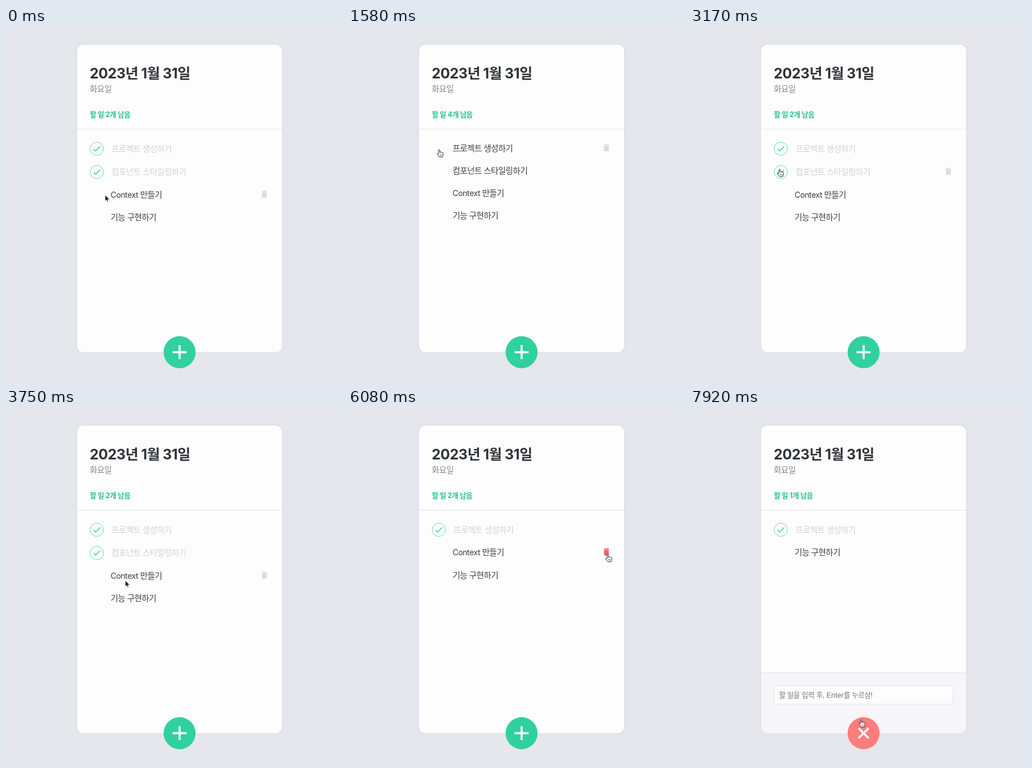
An HTML page for the animation above (8000 ms loop, 600 px wide and 630 px high).

```html
<!DOCTYPE html>
<html lang="ko">
<head>
<meta charset="utf-8">
<title>할 일 목록</title>
<style>
html, body { margin: 0; width: 100%; height: 100%; overflow: hidden; background: #e5e7ec; }
svg { display: block; }
text {
  font: 14.8px Inter, "Noto Sans CJK KR", "Noto Sans CJK JP", sans-serif;
  font-optical-sizing: none;
  letter-spacing: -.041em;
  fill: #3b3f44;
}
tspan { font-size: .96em; letter-spacing: -.033em; }
.bold { font-weight: 700; word-spacing: .03em; }
.bold tspan { font-size: 1em; letter-spacing: -.015em; }
.title { font-size: 25.3px; fill: #2f3236; }
.day { fill: #83888e; }
.left { font-size: 12.7px; fill: #25c194; }
.done { fill: #ced2d8; }
.hint {
  font: 12.6px "Liberation Sans", "Noto Sans CJK KR", "Noto Sans CJK JP", sans-serif;
  letter-spacing: -.035em;
  word-spacing: .04em;
  fill: #707177;
}
.hint tspan { font-size: 1.02em; letter-spacing: 0; }
.card { filter: drop-shadow(0 0 3px rgba(0, 0, 0, .05)); }
</style>
</head>
<body>
<svg id="stage" width="600" height="630" viewBox="0 0 600 630">
  <rect width="600" height="630" fill="#e5e7ec"/>
  <rect class="card" x="127" y="29.8" width="366" height="548.7" rx="11.4" fill="#fefdfe"/>
  <rect x="127" y="180" width="366" height="1" fill="#e0e4e8"/>
  <g id="list"></g>
  <g id="form">
    <path d="M127 470H493V567.1a11.4 11.4 0 0 1-11.4 11.4H138.4a11.4 11.4 0 0 1-11.4-11.4Z" fill="#f6f5f9"/>
    <rect x="127" y="470" width="366" height="1" fill="#e3e5ea"/>
    <rect x="150.4" y="493.7" width="319.4" height="33" rx="2.6" fill="#fefdfe" stroke="#dcdfe4" stroke-width=".8"/>
  </g>
  <circle id="button" cx="310" cy="578.6" r="28.6"/>
  <path id="plus" d="M-12.5 0H12.5M0-12.5V12.5" stroke="#fff" stroke-width="3.6"/>
  <g id="cursor" stroke-linejoin="round">
    <path id="arrow" d="M0 0V11.2L2.6 8.8 4.3 12.6 6 11.9 4.4 8.2H8Z" fill="#111" stroke="#fff" stroke-width=".8"/>
    <g id="hand" stroke="#111" stroke-width=".9">
      <path d="M-1.2 7.6V1.2a1.1 1.1 0 0 1 2.2 0V5q.2-1 1.1-.9t1.1 1.1q.3-.7 1.1-.6t1 1.1q.4-.5 1-.3t.7 1.2v2.2q0 1.5-1.1 3v1.4H0q-.7-1.6-3.6-4.6q-.6-1 .1-1.4t1.3.5z" fill="#fff"/>
      <path d="M1.2 8.6v2.6M2.9 8.6v2.6M4.6 8.6v2.6" stroke-width=".6"/>
    </g>
  </g>
</svg>
<script>
const LOOP = 8000, TICK = 1000 / 12, SCALE = 0.7148;
const LIST_TOP = 194.8, LEFT = 150, BIN_X = 461.4, BIN_RISE = 1.3;
const BUTTON = { x: 310, y: 578.6, r: 28.6 };
const CHECK = "M9 16.2L4.8 12l-1.4 1.4L9 19 21 7l-1.4-1.4L9 16.2z";
const BIN = "M6 19c0 1.1.9 2 2 2h8c1.1 0 2-.9 2-2V7H6v12zM19 4h-3.5l-1-1h-5l-1 1H5v2h14V4z";
const TASKS = ["프로젝트 생성하기", "컴포넌트 스타일링하기", "Context 만들기", "기능 구현하기"];

// tick, pointer x, pointer y
const PATH = [
  [0, 177, 298], [3, 177, 298], [4, 169.5, 272], [6, 169.5, 272],
  [7, 166.5, 257], [12, 166.5, 257], [16, 163, 217], [24, 163, 217],
  [31, 157, 247.5], [33, 160, 252], [38, 160, 252], [45, 213, 306],
  [54, 464, 259.5], [77, 464, 259.5], [84, 305.5, 566.5], [87, 305.5, 554.5]
];
// tick, action, task
const CLICKS = [
  [10, "toggle", 1], [17, "toggle", 0], [22, "toggle", 0], [34, "toggle", 1],
  [59, "remove", 1], [76, "remove", 2], [89, "open"]
];
// tick, hovered row
const HOVER = [[0, 2], [7, 1], [15, 0], [28, 1], [42, 2], [50, 1], [79, -1]];

const $ = id => document.getElementById(id);
const clamp = v => Math.max(0, Math.min(1, v));
const show = (el, on) => el.setAttribute("visibility", on ? "visible" : "hidden");
const move = (el, x, y, rest = "") => el.setAttribute("transform", `translate(${x} ${y}) ${rest}`);

function make(parent, name, attrs) {
  const el = document.createElementNS("http://www.w3.org/2000/svg", name);
  for (const key in attrs) el.setAttribute(key, attrs[key]);
  return parent.appendChild(el);
}

// Latin runs get their own spacing
function write(el, text) {
  el.innerHTML = text.replace(/[A-Za-z0-9,!]+/g, "<tspan>$&</tspan>");
}

function label(parent, text, cls, x, y) {
  const el = make(parent, "text", { class: cls, x, y });
  write(el, text);
  return el;
}

const mix = (a, b, k) => `rgb(${a.map((v, i) => Math.round(v + (b[i] - v) * k))})`;

const list = $("list");
label(list, "2023년 1월 31일", "bold title", 149.5, 89.7);
label(list, "화요일", "day", LEFT - 0.4, 113.9);
const left = label(list, "", "bold left", LEFT - 0.3, 159.2);
label($("form"), "할 일을 입력 후, Enter를 누르삼!", "hint", 159, 514.5);

const rows = TASKS.map(name => {
  const g = make(list, "g", {});
  const tick = make(g, "g", {});
  make(tick, "circle", { cx: LEFT + 12.15, r: 11.8, fill: "none", stroke: "#38d3a6", "stroke-width": 0.8 });
  const mark = make(tick, "path", { d: CHECK, fill: "#2ecb9c" });
  move(mark, LEFT + 12.15 - 12 * SCALE, -12 * SCALE, `scale(${SCALE})`);
  const text = label(g, name, "", 0, 5.2);
  const bin = make(g, "path", { d: BIN });
  move(bin, BIN_X - 12 * SCALE, -BIN_RISE - 12 * SCALE, `scale(${SCALE})`);
  return { g, tick, text, bin };
});

function pointer(n) {
  const i = PATH.findIndex(p => p[0] > n);
  if (i < 0) return PATH[PATH.length - 1].slice(1);
  const [t0, x0, y0] = PATH[i - 1], [t1, x1, y1] = PATH[i];
  const u = (n - t0) / (t1 - t0), k = u * u * (3 - 2 * u);
  return [x0 + (x1 - x0) * k, y0 + (y1 - y0) * k];
}

function stateAt(n) {
  const s = { ids: [0, 1, 2, 3], done: new Set([0, 1]), open: false };
  for (const [t, action, id] of CLICKS) {
    if (t > n) break;
    if (action === "open") s.open = true;
    else if (action === "remove") s.ids = s.ids.filter(i => i !== id);
    else if (!s.done.delete(id)) s.done.add(id);
  }
  return s;
}

function draw(n) {
  const s = stateAt(n), [x, y] = pointer(n);
  const hover = HOVER.filter(h => h[0] <= n).pop()[1];
  let top = LIST_TOP, hand = Math.hypot(x - BUTTON.x, y - BUTTON.y) < BUTTON.r;

  rows.forEach(r => { show(r.g, false); show(r.tick, false); show(r.bin, false); });
  s.ids.forEach((id, slot) => {
    const r = rows[id], done = s.done.has(id);
    const size = (done ? 34 : 32) * SCALE, height = size + 24 * SCALE, mid = top + height / 2;
    const onBin = Math.abs(x - BIN_X) < 8.6 && Math.abs(y - mid + BIN_RISE) < 8.6;
    hand = hand || onBin || Math.hypot(x - LEFT - size / 2, y - mid) < size / 2;
    move(r.g, 0, mid);
    show(r.g, true);
    show(r.tick, done);
    show(r.bin, slot === hover);
    r.bin.setAttribute("fill", onBin ? "#fa5f62" : "#dadde1");
    r.text.setAttribute("class", done ? "done" : "");
    r.text.setAttribute("x", LEFT + size + 20 * SCALE - 0.4);
    top += height;
  });
  write(left, `할 일 ${s.ids.filter(id => !s.done.has(id)).length}개 남음`);

  show($("form"), s.open);
  const turn = s.open ? clamp((n - 88.5) / 1.5) ** 2 : 0;
  const lit = clamp((n - 83.5) / 1.5) ** 2;
  const green = [48, 209, 159], pale = [92, 223, 184], red = [255, 125, 124];
  $("button").setAttribute("fill", s.open ? mix(pale, red, turn) : mix(green, pale, lit));
  move($("plus"), BUTTON.x, BUTTON.y, `rotate(${45 * turn})`);

  move($("cursor"), x, y);
  show($("arrow"), !hand);
  show($("hand"), hand);
}

let last = -1;
function frame(now) {
  const n = Math.floor((now % LOOP + 4) / TICK) % 96;
  if (n !== last) draw(last = n);
  requestAnimationFrame(frame);
}
const start = performance.now();
draw(0);
requestAnimationFrame(function run(now) {
  frame.call(null, Math.max(0, now - start));
});
</script>
</body>
</html>
```
